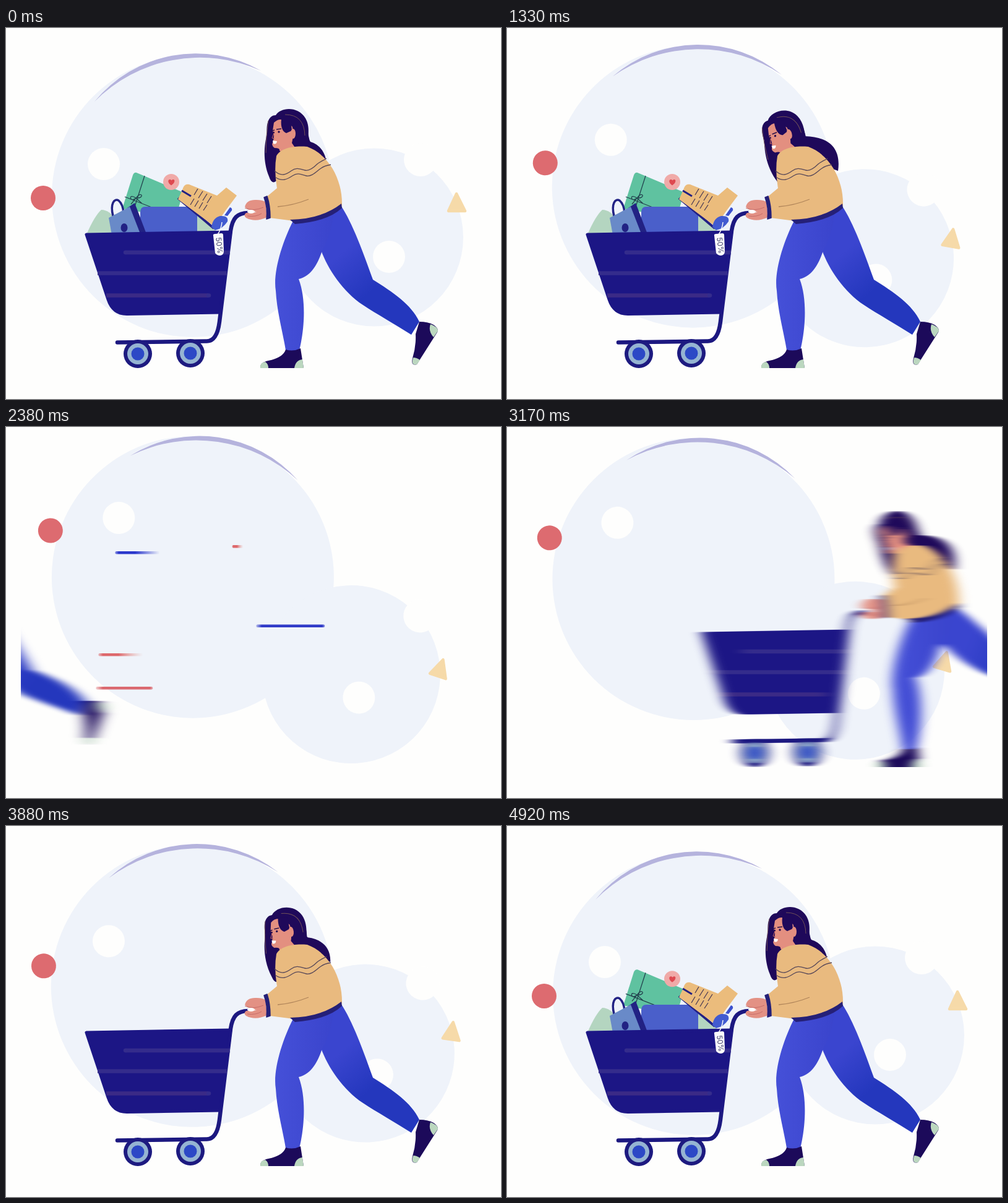
An HTML page for the animation above (4960 ms loop, 800 px wide and 600 px high).

```html
<!DOCTYPE html>
<html lang="en">
<head>
<meta charset="utf-8">
<title>Shopping trip</title>
<style>
html, body { margin: 0; width: 100%; height: 100%; overflow: hidden; background: #fefefd; }
svg { display: block; width: 100%; height: 100%; }
</style>
</head>
<body>
<svg viewBox="0 0 800 600">
  <defs>
    <clipPath id="stage"><rect x="24" width="752" height="600"/></clipPath>
    <linearGradient id="frontFill" x1="0" y1="0" x2="1" y2="0">
      <stop offset="0" stop-color="#4550d8"/><stop offset="1" stop-color="#3a44cc"/>
    </linearGradient>
    <linearGradient id="rearFill" gradientUnits="userSpaceOnUse" x1="535" y1="370" x2="585" y2="430">
      <stop offset="0" stop-color="#3a45cf"/><stop offset="1" stop-color="#2437bd"/>
    </linearGradient>
    <linearGradient id="fadeBlue">
      <stop offset="0" stop-color="#2b38cc" stop-opacity=".5"/><stop offset=".08" stop-color="#2b38cc"/>
      <stop offset=".45" stop-color="#2b38cc"/><stop offset="1" stop-color="#2b38cc" stop-opacity="0"/>
    </linearGradient>
    <linearGradient id="softBlue">
      <stop offset="0" stop-color="#303ac8" stop-opacity=".3"/><stop offset=".08" stop-color="#303ac8"/>
      <stop offset=".96" stop-color="#303ac8"/><stop offset="1" stop-color="#303ac8" stop-opacity=".5"/>
    </linearGradient>
    <linearGradient id="fadeRed">
      <stop offset="0" stop-color="#dd686c" stop-opacity=".4"/><stop offset=".1" stop-color="#dd686c"/>
      <stop offset=".45" stop-color="#dd686c"/><stop offset="1" stop-color="#e8a498" stop-opacity="0"/>
    </linearGradient>
    <linearGradient id="softRed">
      <stop offset="0" stop-color="#da686f" stop-opacity=".3"/><stop offset=".12" stop-color="#da686f"/>
      <stop offset=".95" stop-color="#da686f"/><stop offset="1" stop-color="#da686f" stop-opacity=".5"/>
    </linearGradient>
  </defs>

  <g id="backdrop">
    <g fill="#eff3fa">
      <circle cx="302" cy="272" r="228"/>
      <circle cx="595" cy="338.5" r="144"/>
    </g>
    <path fill="#b5b3dd" d="M143 119A212 212 0 0 1 412 69A240 240 0 0 0 143 119Z"/>
    <g fill="#fefefd">
      <circle cx="158" cy="220" r="26"/>
      <circle cx="619" cy="370" r="26"/>
      <circle cx="670" cy="213" r="27"/>
    </g>
    <circle cx="60" cy="275" r="20" fill="#dd6b70"/>
    <path d="M728 268L715 296L742 296Z" fill="#f6daa9" stroke="#f6daa9" stroke-width="4.500" stroke-linejoin="round"/>
  </g>

  <g clip-path="url(#stage)">
    <g id="shopper">
      <g id="goods">
        <g id="pale" fill="#b4d5c0">
          <path d="M130 334Q143 304 154 294Q168 294 178 312L180 340H130Z"/>
          <path d="M306 334L308 302Q325 308 342 332Z"/>
        </g>
        <g id="gift">
          <path d="M211 234L282 264Q286 266 285 270L274 308L188 292L205 238Q207 233 211 234Z" fill="#5fc2a0"/>
          <path d="M224 239L207 292M192 273L238 291M210 275C197 266 200 284 210 275C219 262 225 276 210 275L202 285M210 275L220 284" fill="none" stroke="#23434f" stroke-width="1.300"/>
          <circle cx="267" cy="249" r="13" fill="#f0aaa8"/>
          <path d="M267 254.500C258 248 264 242 267.500 246.500C272 242 276 249 267 254.500Z" fill="#de4950"/>
        </g>
        <g id="box">
          <path d="M225 289H302Q309 289 309 297V336H217V298Q217 289 225 289Z" fill="#4a5fca"/>
        </g>
        <g id="boot">
          <path d="M278 275L336 324" stroke="#222084" stroke-width="4"/>
          <path d="M285 262Q288 251 296 253L341 271L356 258L373 271L355 295L337 321L278 277Z" fill="#ebbc7c"/>
          <path d="M284 263L299 272" stroke="#222084" stroke-width="3"/>
          <path d="M310 260L304 270M318 264L311 275M325 268L318 279M332 272L325 283M304 276L298 286M311 279L305 289M318 282L312 292M325 286L319 295" stroke="#4a3a54" stroke-width="1.300"/>
          <path d="M362 290Q366 291 365 295L358 304L353 303Z" fill="#3b50cc"/>
          <path d="M332 322Q334 307 346 304Q360 303 358 313Q350 325 338 327Z" fill="#425bd0"/>
        </g>
        <g id="bag">
          <path d="M173 304C168 284 175 275 182 279Q189 285 190 299" fill="none" stroke="#222284" stroke-width="3.500"/>
          <path d="M196 291L208 283L230 341L214 347Z" fill="#222284"/>
          <path d="M166 307L200 289L221 343L176 362Z" fill="#698ac8"/>
          <ellipse cx="191" cy="323" rx="5.500" ry="7" fill="#222284"/>
        </g>
      </g>

      <g stroke-linecap="round" fill="none" stroke="#1c1880" stroke-width="6.500">
        <path d="M394 299C373 298 366 308 363 328L345 475Q341 507 324 506.500L180 508.500"/>
      </g>
      <path d="M130 334L363 330L346 460L196 462.500Q173 463 165 439Z" fill="#1c1685" stroke="#1c1685" stroke-width="5" stroke-linejoin="round"/>
      <g stroke="#342c8c" stroke-width="6.500">
        <path d="M193 363H362M148 396.500H357"/>
        <path d="M162 432.500H327" stroke="#3b2a86"/>
        <path d="M193 363H194M327 432.500H328" stroke-linecap="round"/>
      </g>
      <g id="wheels"></g>
      <g id="tag">
        <path d="M349 314Q348 325 342 334" fill="none" stroke="#f4f5f8" stroke-width="1.500"/>
        <path d="M335 336Q334 333 338 333L348 332Q351 332 351 335L352 361Q352 367 346 368Q341 368 338 364Z" fill="#fbfbfc"/>
        <text transform="translate(339 339) rotate(83)" font-family="Inter, Arial, sans-serif" font-size="12" fill="#444370">50%</text>
      </g>

      <g id="rearLeg">
        <path d="M541 287C560 315 578 365 593 407C625 427 655 447 668 475L655 496C630 480 598 462 577 448C545 427 520 390 509 359L490 305Z" fill="url(#rearFill)"/>
        <path d="M668 475Q682 475 691 480Q700 486 697 492L664 544Q654 547 657 534Q663 514 662 495Z" fill="#1c0a5a"/>
        <path d="M686 479Q699 484 698 490L691 500Q682 490 686 479ZM658 533Q664 533 669 537L664 544Q654 547 658 533Z" fill="#bbd7bf"/>
      </g>
      <path d="M464 312C447 345 431 395 436 425C438 460 447 490 452 521Q463 524 474 521C482 490 486 440 473 406C495 401 505 378 511 360C522 340 528 320 530 296Z" fill="url(#frontFill)"/>
      <path d="M452 520Q464 524 476 518L481 550H411Q410 541 424 538Q448 533 452 520Z" fill="#1c0a5a"/>
      <path d="M411 550Q410 541 419 540Q424 543 424 550ZM466 550Q468 537 479 536L481 550Z" fill="#bbd7bf"/>

      <path id="blown" fill="#1f095a"/>
      <g id="head">
        <path d="M436 141C444 128 472 126 484 146C492 160 488 176 487 188L470 205L436 248Q429 253 425 240C415 215 417 190 422 171C420 154 425 141 436 141Z" fill="#1f095a"/>
        <path d="M433 153Q446 140 463 160L468 202Q454 214 442 198Q443 194 434 194Q428 190 431 183L429 179Z" fill="#e38f80"/>
        <path d="M434 146Q443 134 458 145Q466 155 466 166L462 186Q468 195 473 201L488 188Q491 160 479 142Q456 124 434 146Z" fill="#1f095a"/>
        <path d="M445 147Q443 166 453 170L462 166L460 147Z" fill="#1f095a"/>
        <path d="M437 144Q426 151 433 174Q433 185 426 194L419 192C425 172 418 148 437 144Z" fill="#1f095a"/>
        <ellipse cx="464" cy="171" rx="4" ry="8" fill="#e38f80"/>
        <path d="M451 140Q482 140 483 174M424 150Q420 174 420 202" fill="none" stroke="#6f5058" stroke-width="1"/>
        <path d="M437 164L445 163M431 166L434 165" stroke="#2b1048" stroke-width="1.600"/>
        <g fill="#260c4d"><circle cx="441" cy="168" r="1.700"/><circle cx="432.500" cy="169" r="1.500"/></g>
        <path d="M431 182L438 183Q437 189 432 187Z" fill="#fff"/>
        <path d="M433 170L430 178L434 179" fill="none" stroke="#c76860" stroke-width="1"/>
      </g>

      <path d="M437 207C444 194 465 190 487 192C522 205 544 245 543 287Q516 310 465 312L426 307L420 274L438 259Q433 230 437 207Z" fill="#e9ba7f"/>
      <g fill="none" stroke="#584858" stroke-width="1.300">
        <path d="M434 231C445 241 453 237 461 231S475 228 483 230S499 224 503 220S514 214 518 211"/>
        <path d="M435 241C446 249 454 245 463 239S477 237 485 239S501 233 506 229S518 222 525 221"/>
        <path d="M439 289Q464 287 489 277" stroke="#b0855a"/>
      </g>
      <path d="M459 310Q510 309 542 284L543 291Q520 313 467 317Z" fill="#252078"/>
      <path d="M386 289Q389 277 405 278Q414 278 419 281L422 306Q403 315 388 307Q383 303 388 299L405 298L390 293Z" fill="#e39184"/>
      <path d="M386 291Q400 297 416 290M390 304Q404 306 413 300" fill="none" stroke="#c76d68" stroke-width="1"/>
      <ellipse cx="396" cy="297" rx="6" ry="3" fill="#fff"/>
      <path d="M417 274L422 272Q427 287 427 307L421 309Q423 290 417 274Z" fill="#252078" stroke="#252078" stroke-width="1.500" stroke-linejoin="round"/>
    </g>

    <g id="wind">
      <rect x="360" y="232" width="72" height="4.500" rx="2" fill="url(#fadeBlue)"/>
      <rect x="549" y="222" width="18" height="4.500" rx="2" fill="url(#fadeRed)"/>
      <rect x="588" y="350.500" width="111" height="4.500" rx="2" fill="url(#softBlue)"/>
      <rect x="333" y="397" width="72" height="4.500" rx="2" fill="url(#fadeRed)"/>
      <rect x="329" y="451" width="92" height="4.500" rx="2" fill="url(#softRed)"/>
    </g>
  </g>
</svg>
<script>
const LOOP = 4960, SHUTTER = 25, BLUR = SHUTTER / 3.46;
const NS = 'http://www.w3.org/2000/svg';
const $ = id => document.getElementById(id);
const clamp = v => Math.max(0, Math.min(1, v));
const ramp = (t, from, to) => clamp((t - from) / (to - from));
const sine = u => (1 - Math.cos(Math.PI * u)) / 2;
const cube = u => u * u * u;
const cubeInOut = u => u < .5 ? 4 * cube(u) : 1 - 4 * cube(1 - u);

function make(tag, attrs, parent) {
  const el = document.createElementNS(NS, tag);
  for (const key in attrs) el.setAttribute(key, attrs[key]);
  return parent.appendChild(el);
}

for (const [cx, cy] of [[213, 527], [298, 526]])
  for (const [r, fill] of [[23, '#1d1a80'], [17, '#95b4d2'], [10.5, '#2c48c6']])
    make('circle', { cx, cy, r, fill }, $('wheels'));

// Directional blur that is switched off when the part is slow
function blurrer(el) {
  const id = el.id + 'Blur';
  const filter = make('filter', { id, filterUnits: 'userSpaceOnUse', x: 0, y: -50, width: 900, height: 700,
    'color-interpolation-filters': 'sRGB' }, document.querySelector('defs'));
  const blur = make('feGaussianBlur', {}, filter);
  return (x, y) => {
    if (Math.max(x, y) < .3) return el.removeAttribute('filter');
    blur.setAttribute('stdDeviation', `${x} ${y}`);
    el.setAttribute('filter', `url(#${id})`);
  };
}

const drops = [
  ['bag', 4090, 290], ['pale', 4290, 380], ['box', 4300, 380],
  ['boot', 4330, 380], ['tag', 4330, 400], ['gift', 4420, 380]
].map(([id, start, height]) => ({ el: $(id), start, height, blur: blurrer($(id)) }));
const FALL = 600, REENTRY = 2700;

const shopper = $('shopper'), shopperBlur = blurrer(shopper);

const travel = t => t < REENTRY
  ? -700 * cubeInOut(ramp(t, 1950, 2625))
  : 700 * cube(1 - ramp(t, 2940, 3590));

const hairRest = [470, 150, 492, 165, 488, 178, 492, 184, 505, 188, 514, 198, 517, 212, 480, 215, 455, 190];
const hairBlown = [460, 160, 474, 170, 474, 175, 482, 175, 515, 176, 541, 190, 535, 231, 490, 215, 455, 195];

// The rear leg kicks up and the head dips further while she runs
function pose(t, x) {
  const kick = x < 0 ? -x * .02 : Math.min(30, x * .145);
  const lean = sine(ramp(t, 800, 1200)) - sine(ramp(t, 3600, 4100));
  $('rearLeg').setAttribute('transform', `rotate(${-kick} 525 320)`);
  $('head').setAttribute('transform', `rotate(${-15 * lean - kick * .3} 462 200)`);
  const p = hairRest.map((v, i) => v + (hairBlown[i] - v) * lean);
  $('blown').setAttribute('d', `M${p.slice(0, 2)}C${p.slice(2, 14)}L${p.slice(14)}Z`);
}

function dropGoods(t) {
  for (const { el, start, height, blur } of drops) {
    const left = t > REENTRY ? 1 - ramp(t, start, start + FALL) : 0;
    el.setAttribute('visibility', left < 1 ? 'inherit' : 'hidden');
    el.setAttribute('transform', `translate(0 ${-height * cube(left)})`);
    blur(0, left < 1 ? 3 * height * left * left / FALL * BLUR : 0);
  }
}

function gusts(t) {
  const early = t < 2900;
  const away = t - (early ? 2380 : 3420);
  const x = (early ? -184 : 0) + away * .3, y = early ? -31 : 0;
  $('wind').setAttribute('transform', `translate(${x} ${y})`);
  $('wind').setAttribute('opacity', clamp((220 - Math.abs(away)) / 100));
}

function draw(t) {
  const turn = t < 2620 ? sine(t / 2620) : sine((LOOP - t) / (LOOP - 2620));
  $('backdrop').setAttribute('transform', `rotate(${19.2 * turn} 390.5 257)`);

  const x = travel(t);
  const speed = t < REENTRY - 1 ? Math.abs(travel(t + 1) - x) : Math.abs(x - travel(t + 1)) % 20;
  shopper.setAttribute('transform', `translate(${x} 0)`);
  shopper.setAttribute('visibility', Math.abs(x) < 699 ? 'visible' : 'hidden');
  shopperBlur(speed * BLUR, 0);

  pose(t, x);
  dropGoods(t);
  gusts(t);
}

const begin = performance.now();
function tick() {
  draw((performance.now() - begin) % LOOP);
  requestAnimationFrame(tick);
}
tick();
</script>
</body>
</html>
```
